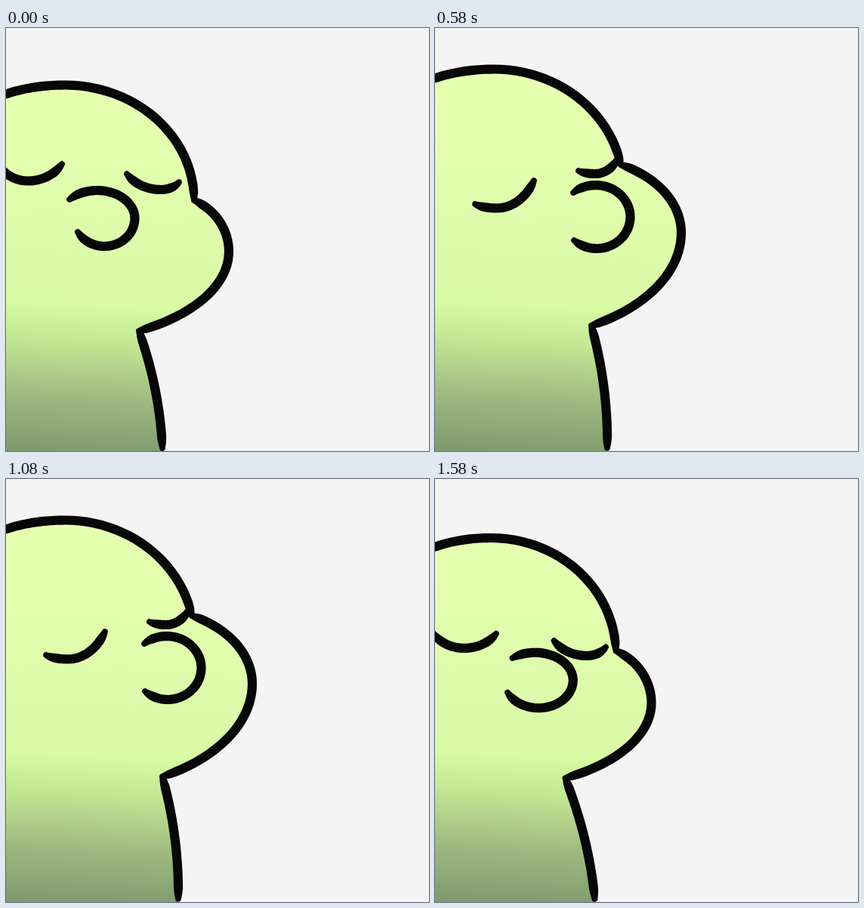
An HTML page that plays this animation: 560x560 px, repeating every 1.7 s.

```html
<!DOCTYPE html>
<html lang="en">
<head>
<meta charset="utf-8">
<title>Swaying head</title>
<style>
  html, body { margin: 0; width: 100%; height: 100%; overflow: hidden; background: #f4f4f4; }
  svg { display: block; width: 100vw; height: 100vh; }
</style>
</head>
<body>
<svg viewBox="0 0 560 560">
  <defs>
    <linearGradient id="skin" gradientUnits="userSpaceOnUse" x1="0" y1="70" x2="-27" y2="560">
      <stop offset="0" stop-color="#e5ffb0"/>
      <stop offset=".55" stop-color="#dafaa8"/>
      <stop offset=".59" stop-color="#d6fba3"/>
      <stop offset=".68" stop-color="#c5ea95"/>
      <stop offset=".85" stop-color="#9cb87f"/>
      <stop offset="1" stop-color="#7d996e"/>
    </linearGradient>
  </defs>
  <rect width="560" height="560" fill="#f4f4f4"/>
  <path id="body" fill="url(#skin)"/>
  <path id="ink" fill="#060706"/>
</svg>
<script>
const LOOP = 1700, FPS = 12, TURN = 10;
const HALF = 6.1, TAPER = 16;
const FOOT_Y = 556, NECK_BOW = 6;
const rad = deg => deg * Math.PI / 180;

// Key poses of the sway. Eyes: left tip, lowest point, right tip.
// Nose: rightmost point, upper end, lower end; noseH is half its height.
const poses = [
  { step: 0, top: [78, 75.5], brow: [249, 228], bulge: [295, 296], chin: [176, 401], foot: 207,
    nose: [[170.5, 252], [84, 227], [95, 270]], noseH: 37,
    eyes: [[[-14, 176], [29, 202.5], [74, 180]], [[160, 193], [205, 214], [229, 204]]] },
  { step: 2, top: [70, 80.5], brow: [230, 227], bulge: [278, 297], chin: [169, 391], foot: 216,
    nose: [[195, 281], [121, 247], [97, 295]], noseH: 36.5,
    eyes: [[[10, 233], [48, 245.5], [88, 229]], [[155, 235], [197, 254], [223, 241]]] },
  { step: 5, top: [84, 63.5], brow: [242, 197], bulge: [308.5, 288], chin: [195, 391], foot: 244,
    nose: [[231, 257], [168, 228], [158, 284]], noseH: 35,
    eyes: [[[45, 227], [74, 235], [109, 214]], [[185, 207], [212, 216], [239, 196]]] },
  { step: 7, top: [78, 54.5], brow: [246, 181], bulge: [326, 271], chin: [207, 394], foot: 228,
    nose: [[258.5, 250], [183, 218], [184, 281]], noseH: 42,
    eyes: [[[53, 233], [82, 238.5], [131, 202]], [[190, 189], [212, 193], [241, 174]]] },
  { step: 9, top: [78, 57], brow: [246, 177], bulge: [340, 282], chin: [230, 405], foot: 220,
    nose: [[301.5, 249], [215, 206], [209, 286]], noseH: 49,
    eyes: [[[76, 235], [103, 241], [152, 210]], [[219, 189], [228, 189.5], [246, 178]]] }
];

const body = document.getElementById("body");
const ink = document.getElementById("ink");

// Blends numbers, lists and poses alike.
function mix(a, b, k) {
  if (typeof a === "number") return a + (b - a) * k;
  if (Array.isArray(a)) return a.map((v, i) => mix(v, b[i], k));
  return Object.fromEntries(Object.keys(a).map(key => [key, mix(a[key], b[key], k)]));
}

function poseAt(step) {
  let i = 0;
  while (i < poses.length - 2 && step > poses[i + 1].step) i++;
  const a = poses[i], b = poses[i + 1];
  return mix(a, b, (step - a.step) / (b.step - a.step));
}

// Piece of an ellipse from its apex to an end; axis 0 or 1 is the apex tangent, x or y.
function arc(apex, end, angle, axis) {
  const n = 24, pts = [], other = 1 - axis;
  for (let i = 0; i <= n; i++) {
    const a = angle * i / n, p = [];
    p[axis] = apex[axis] + (end[axis] - apex[axis]) * Math.sin(a) / Math.sin(angle);
    p[other] = apex[other] + (end[other] - apex[other]) * (1 - Math.cos(a)) / (1 - Math.cos(angle));
    pts.push(p);
  }
  return pts;
}

// Two arcs meeting at the apex.
const bend = (from, apex, to, angleA, angleB, axis) =>
  arc(apex, from, angleA, axis).reverse().concat(arc(apex, to, angleB, axis).slice(1));

function neckLine([x, y], foot) {
  const n = 24;
  return Array.from({ length: n + 1 }, (_, i) => {
    const t = i / n;
    return [x + (foot - x) * t + 4 * NECK_BOW * t * (1 - t), y + (FOOT_Y - y) * t];
  });
}

const xy = p => p[0].toFixed(2) + " " + p[1].toFixed(2);

// Outline of a round brush line that thins towards both ends.
function brush(pts) {
  const dist = [0], last = pts.length - 1;
  for (let i = 1; i <= last; i++) {
    dist.push(dist[i - 1] + Math.hypot(pts[i][0] - pts[i - 1][0], pts[i][1] - pts[i - 1][1]));
  }
  const left = [], right = [];
  const tip = HALF * 0.64;
  pts.forEach(([x, y], i) => {
    const a = pts[Math.max(i - 1, 0)], b = pts[Math.min(i + 1, last)];
    const dx = b[0] - a[0], dy = b[1] - a[1], len = Math.hypot(dx, dy) || 1;
    const end = Math.min(1, Math.min(dist[i], dist[last] - dist[i]) / TAPER);
    const w = tip + (HALF - tip) * Math.sin(end * Math.PI / 2);
    left.push([x - dy / len * w, y + dx / len * w]);
    right.unshift([x + dy / len * w, y - dx / len * w]);
  });
  const cap = `A${tip} ${tip} 0 0 0 `;
  return "M" + left.map(xy).join("L") + cap + right.map(xy).join("L") + cap + xy(left[0]) + "Z";
}

function draw(ms) {
  const tick = Math.floor(ms % LOOP / 10) * 10;
  const count = Math.min(2 * TURN - 1, Math.floor((tick + 9.9) * FPS / 1000));
  const step = TURN - Math.abs(TURN - count);
  const { top, brow, bulge, chin, foot, nose, noseH, eyes } = poseAt(step);

  // The forehead slants more the further the head leans out.
  const head = bend([-10, top[1] + 16], top, brow, rad(45), rad(90 - 1.6 * step), 0);
  const cheek = bend(brow, bulge, chin, rad(65), rad(62), 1);
  const neck = neckLine(chin, foot);

  const [tip, up, down] = nose;
  const sweep = end => Math.PI - Math.asin(Math.min(1, Math.abs(end[1] - tip[1]) / noseH));
  const noseLine = bend(up, tip, down, sweep(up), sweep(down), 1);
  const lids = eyes.map(([a, low, b]) => bend(a, low, b, rad(60), rad(60), 0));

  ink.setAttribute("d", [head, cheek, neck, noseLine, ...lids].map(brush).join(""));
  const edge = [...head, ...cheek, ...neck, [foot, 580], [-20, 580]];
  body.setAttribute("d", "M" + edge.map(xy).join("L") + "Z");
}

const start = performance.now();
function loop() {
  draw(performance.now() - start);
  requestAnimationFrame(loop);
}
draw(0);
requestAnimationFrame(loop);
</script>
</body>
</html>
```
